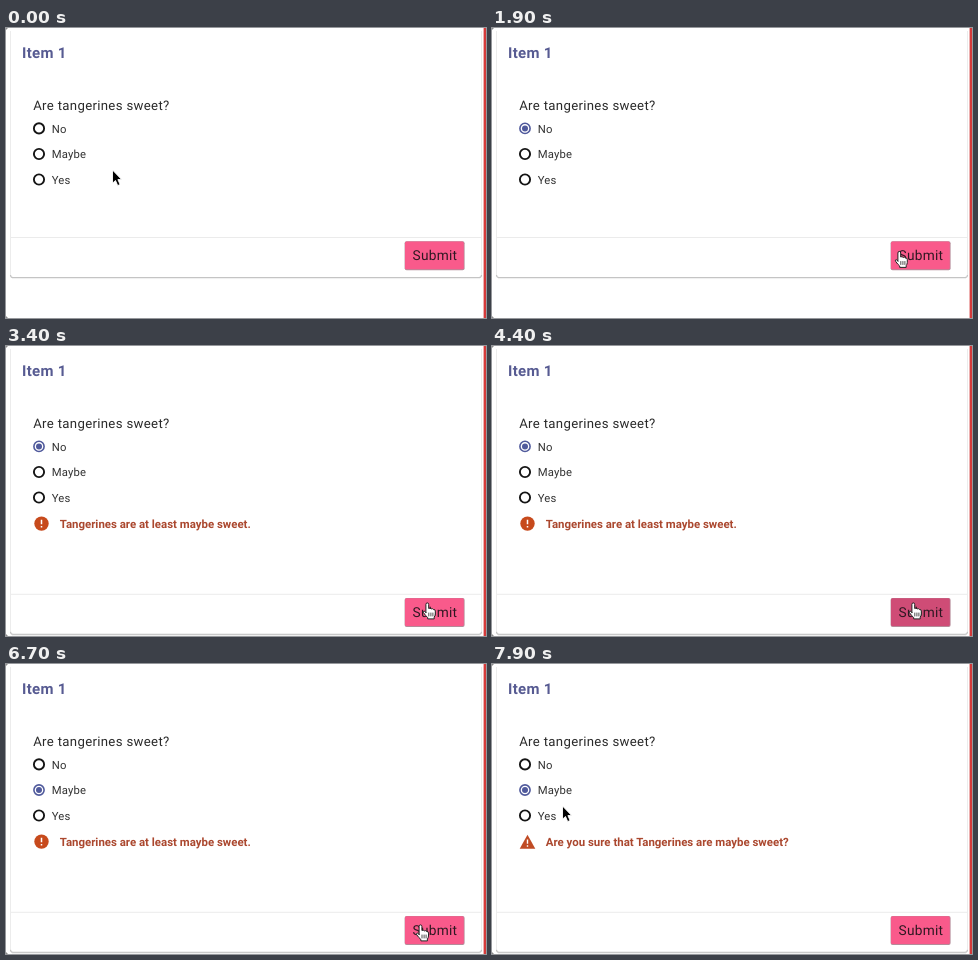
Recreate the animation shown at these times as an HTML page. Size 480 by 290 pixels, loop 8000 ms.

```html
<!DOCTYPE html>
<html lang="en">
<head>
<meta charset="utf-8">
<title>Quiz item</title>
<style>
  html, body { margin: 0; width: 100%; height: 100%; overflow: hidden; background: #fff; }
  svg { display: block; width: 480px; height: 290px; }
  text { font-family: Roboto, Arial, sans-serif; fill: #2a2a2a; text-rendering: geometricPrecision; }
  .title { font-size: 15px; font-weight: 700; letter-spacing: .3px; fill: #575b92; }
  .question { font-size: 13.2px; letter-spacing: .32px; }
  .label { font-size: 11.3px; letter-spacing: .15px; fill: #333; }
  .note { font-size: 11.45px; font-weight: 700; fill: #ab482f; }
  .submit { font-size: 13.7px; letter-spacing: .25px; fill: #2f1822; }
</style>
</head>
<body>
<svg viewBox="0 0 480 290">
  <rect width="480" height="290" fill="#fff"/>
  <path d="M0 0h2l-2 2zM0 290h2l-2-2z" fill="#888"/>
  <rect x="477.6" width="2.4" height="290" fill="#d43a3a"/>

  <path id="sides" fill="none" stroke="#ececec"/>
  <g id="footer">
    <path d="M5 209.5H475" stroke="#ebebeb"/>
    <path d="M4.5 247q0 2.5 2.5 2.5H473q2.5 0 2.5-2.5" fill="none" stroke="#c4c4c4" stroke-width="1.2"/>
    <path d="M6 250.6H474" stroke="#efefef"/>
    <rect x="398.6" y="213.2" width="60" height="29" rx="2" fill="#b58b99"/>
    <rect id="button" x="399" y="213.5" width="58.8" height="27.8" rx="1.5"/>
    <text class="submit" x="406.6" y="232.4">Submit</text>
  </g>

  <text class="title" x="16" y="29.8">Item 1</text>
  <text class="question" x="27.2" y="81.8">Are tangerines sweet?</text>
  <g id="options"></g>

  <g id="error">
    <circle cx="35.5" cy="177.6" r="7.2" fill="#c74a1c"/>
    <path d="M35.5 173.7v4.6M35.5 179.9v1.7" stroke="#fff" stroke-width="1.5"/>
    <text class="note" x="53.8" y="181.9">Tangerines are at least maybe sweet.</text>
  </g>
  <g id="warning">
    <path d="M35.5 170.8l7.8 13.9H27.7z" fill="#c04b24"/>
    <path d="M35.5 175.6v4.2M35.5 181.2v1.6" stroke="#fff" stroke-width="1.4"/>
    <text class="note" x="53.8" y="181.9">Are you sure that Tangerines are maybe sweet?</text>
  </g>

  <circle id="ring" r="27.6" fill="none" stroke="#111" stroke-width="1.4"/>
  <g id="cursor">
    <path id="arrow" d="M0 0V13.2L3 10.5L5.2 15.6L7.6 14.5L5.4 9.6H9.2Z"
      fill="#000" stroke="#fff" stroke-width=".9" stroke-linejoin="round"/>
    <g id="hand" stroke="#222" stroke-width="1" stroke-linejoin="round" stroke-linecap="round">
      <path fill="#fff" d="M-1.6 9V1Q-1.6-.6-.2-.6T1.2 1V5Q2.6 4 3.6 5.4Q5 4.6 5.9 6
        Q7.8 5.6 7.8 7.6V10.5Q7.6 12.5 6.7 13.6V15.4H.2V14Q-1.8 12.4-4 9.2Q-4.6 7.8-3.4 7.6Q-2.5 7.6-1.6 9Z"/>
      <path fill="none" stroke-width=".8" d="M1.3 9.5v3M3.4 9.5v3M5.4 9.5v3"/>
    </g>
  </g>
</svg>
<script>
const LOOP = 8000, STEP = 100, GROW = 38.8;
const $ = id => document.getElementById(id);

// Pointer stops: time, x, y
const path = [
  [0, 106.5, 142], [700, 47.5, 101], [1300, 47.5, 101], [1900, 407.5, 224],
  [2200, 407.5, 226], [2500, 407.5, 226], [3100, 421.5, 257.5], [4900, 421.5, 257.5],
  [5400, 68, 124.5], [5900, 68, 124.5], [6600, 414.7, 261.5], [7100, 414.7, 261.5],
  [7800, 70.5, 142], [LOOP, 70.5, 142]
];
const clicks = [1100, 2200, 3700, 4300, 5500, 6800];
const submits = [2200, 3700, 4300, 6800];

// Options: label, centre y, right end of the clickable area
const options = [["No", 100.4, 62], ["Maybe", 126, 82], ["Yes", 151.5, 66]];
$("options").innerHTML = options.map(([name, y]) =>
  `<circle class="radio" cx="33" cy="${y}" r="5.1" fill="#fff"/>
   <circle class="dot" cx="33" cy="${y}" r="3" fill="#505a9c"/>
   <text class="label" x="45.8" y="${y + 4.1}">${name}</text>`).join("");
const radios = [...document.querySelectorAll(".radio")];
const dots = [...document.querySelectorAll(".dot")];

const show = (el, on) => el.setAttribute("visibility", on ? "visible" : "hidden");
const ease = p => p * p * (3 - 2 * p);

function pointerAt(t) {
  const i = path.findIndex(k => k[0] > t);
  const [t0, x0, y0] = path[i - 1], [t1, x1, y1] = path[i];
  const p = ease((t - t0) / (t1 - t0));
  return [x0 + (x1 - x0) * p, y0 + (y1 - y0) * p];
}

// Button press tint: holds briefly, then fades
function pressAt(t) {
  return Math.max(...submits.map(c => {
    const d = t - c;
    return d < 0 || d >= 500 ? 0 : Math.min(1, (500 - d) / 200);
  }));
}

function isOver(x, y, shift) {
  const onButton = x > 399 && x < 458 && y > 213 + shift && y < 242 + shift;
  return onButton || options.some(([, cy, right]) => x > 26 && x < right && Math.abs(y - cy) < 10);
}

function render(time) {
  const t = Math.floor(time % LOOP / STEP) * STEP;
  const shift = t >= 2300 ? GROW : 0;
  const chosen = t < 1200 ? -1 : t < 5600 ? 0 : 1;
  const [x, y] = pointerAt(t);

  $("footer").setAttribute("transform", `translate(0 ${shift})`);
  $("sides").setAttribute("d", `M4.5 3V${247 + shift}M475.5 3V${247 + shift}`);
  const k = pressAt(t), mix = (a, b) => Math.round(a + (b - a) * k);
  $("button").setAttribute("fill", `rgb(${mix(249, 207)},${mix(90, 76)},${mix(139, 118)})`);

  radios.forEach((r, i) => {
    const on = i === chosen;
    r.setAttribute("stroke", on ? "#505a9c" : "#151515");
    r.setAttribute("stroke-width", on ? 1.6 : 1.9);
    show(dots[i], on);
  });
  show($("error"), t >= 2300 && t < 6900);
  show($("warning"), t >= 6900);

  const hand = isOver(x, y, shift);
  show($("hand"), hand);
  show($("arrow"), !hand);
  $("cursor").setAttribute("transform", `translate(${x} ${y})`);
  $("ring").setAttribute("cx", x);
  $("ring").setAttribute("cy", y);
  show($("ring"), clicks.includes(t));
}

const start = performance.now();
function tick() {
  render(performance.now() - start);
  requestAnimationFrame(tick);
}
tick();
</script>
</body>
</html>
```
